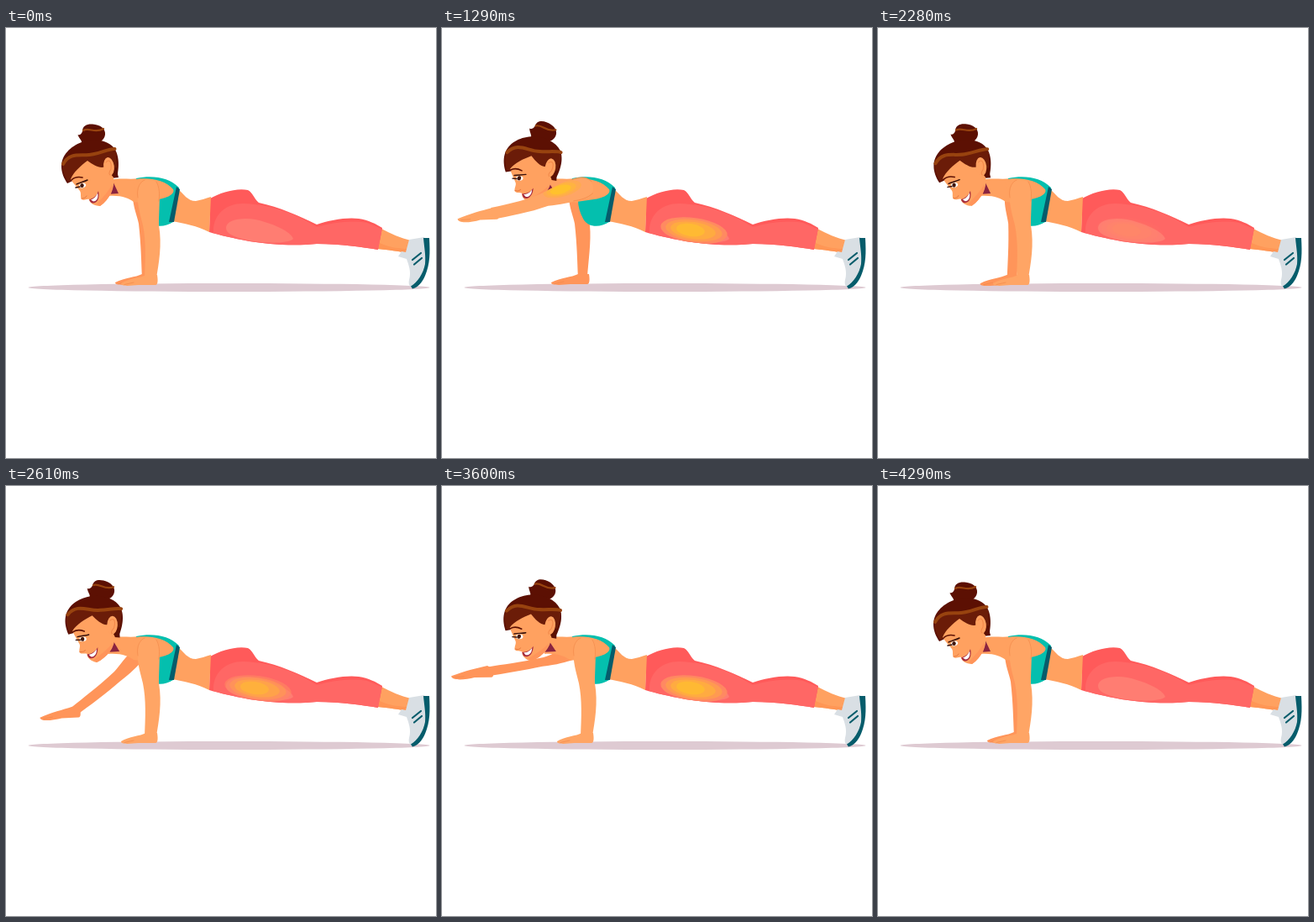
An HTML page with a canvas that plays this animation: 512x512 px, repeating every 4470 ms.

```html
<!DOCTYPE html>
<html lang="en">
<head>
<meta charset="utf-8">
<title>Plank arm raise</title>
<style>
html, body { margin: 0; width: 100%; height: 100%; overflow: hidden; background: #fff; }
canvas { display: block; width: 100vw; height: 100vh; }
</style>
</head>
<body>
<canvas id="stage"></canvas>
<script>
const canvas = document.getElementById('stage');
const ctx = canvas.getContext('2d');
const SIZE = 512, LOOP = 4470, STEP = 30, RAD = Math.PI / 180;

const SKIN = '#ffa160', SKIN_NEAR = '#ffa565', SKIN_FAR = '#ff955a', SKIN_LINE = '#f28a4b';
const HAIR = '#5c1003', HAIR_MID = '#6b1c08', HAIR_LIGHT = '#98430f';
const TEAL = '#04bfae', NAVY = '#065c6b';

const path = d => new Path2D(d);
const legs = path('M243 203C255 196 275 190 288 193C294 196 295 203 301 208C325 213 350 224 370 234C385 229 405 225 420 227C432 229 440 233 448 238L443 264C425 261 400 257 370 257C340 260 310 257 290 254C270 250 255 247 242 243Z');

function fill(shape, color) {
  ctx.fillStyle = color;
  ctx.fill(typeof shape === 'string' ? path(shape) : shape);
}

function line(d, color, width) {
  ctx.strokeStyle = color;
  ctx.lineWidth = width;
  ctx.stroke(path(d));
}

function oval(x, y, rx, ry, angle, color) {
  ctx.fillStyle = color;
  ctx.beginPath();
  ctx.ellipse(x, y, rx, ry, angle * RAD, 0, 2 * Math.PI);
  ctx.fill();
}

// 0 = hand on the floor, 1 = arm stretched forward
function lift(t, upFrom, upTo, downFrom, downTo) {
  const up = (t - upFrom) / (upTo - upFrom);
  const down = (downTo - t) / (downTo - downFrom);
  const u = Math.max(0, Math.min(1, up, down));
  return Math.sin(u * Math.PI / 2);
}

const nearArm = {
  x: 170, y: 190, wrist: [3, 108], swing: 78, stretch: .06, droop: 18,
  reach: 36, grow: 6, color: SKIN_NEAR, glow: true,
  shape: p => {
    const k = 4 * p;
    return `M-13 2C-12 -13 13 -14 13 4C13 20 12 32 ${12 - k / 2} 45C${16 - k} 68 ${12 - k / 2} 90 9 108L-5 108C-4 85 -3 65 -7 45C-10 32 -15 18 -13 2Z`;
  }
};

const farArm = {
  x: 157, y: 199, wrist: [11, 98], swing: 91, stretch: .08, droop: 3,
  reach: 38, grow: 5, color: SKIN_FAR, glow: false,
  shape: p => {
    const k = 8 * p;
    return `M-6 0C-4 -8 ${12 - k} -8 ${15 - k} 0C${17 - k} 10 ${19 - k} 20 ${19 - k} 36C${21 - k} 55 ${17 - k / 4} 80 16 98L5 98C4 80 4 60 1 34C-1 24 -6 14 -6 0Z`;
  }
};

function drawArm(arm, p) {
  const turn = arm.swing * p * RAD, len = 1 + arm.stretch * p;
  const [wx, wy] = [arm.wrist[0], arm.wrist[1] * len];
  const c = Math.cos(turn), s = Math.sin(turn);

  ctx.save();
  ctx.translate(arm.x + wx * c - wy * s, arm.y + wx * s + wy * c);
  ctx.rotate(-arm.droop * Math.sin(Math.PI * p) * RAD);
  const tip = arm.reach + arm.grow * p, heel = 8 - 2 * p, drop = 6 - 2 * p;
  fill(`M${-6 + 7 * p} ${-4 - 4 * p}C-14 ${-5 * p} -26 ${-2 * p} ${-tip} ${drop}C${-tip} 10 -26 9 -15 ${heel}L5 ${heel}C8 ${heel} 8 2 7 -4Z`, arm.color);
  line(`M${-tip + 4} ${drop + 1.5}L${-tip + 15} 5`, SKIN_LINE, .7);
  ctx.restore();

  ctx.save();
  ctx.translate(arm.x, arm.y);
  ctx.rotate(turn);
  ctx.scale(1, len);
  const shape = path(arm.shape(p));
  fill(shape, arm.color);
  if (arm.glow) {
    line('M-13 12C-15 0 -10 -7 -5 -9M9 -7C13 0 13 8 12 16', SKIN_LINE, .7);
    ctx.clip(shape);
    ctx.globalAlpha = p;
    oval(-5, 25, 9, 22, 0, '#ffaa50');
    oval(-5, 26, 7, 17, 0, '#ffb441');
    oval(-5, 27, 5, 12, 0, '#ffc22d');
  }
  ctx.restore();
}

function drawLegs(glow) {
  fill('M447 239C458 245 470 250 482 253L478 268C468 266 455 264 443 263Z', SKIN);
  fill('M445 256C456 261 468 263 479 263L478 268C468 266 455 264 443 263Z', '#ff9655');
  fill('M480 252L498 249L502 275C499 290 492 302 484 309C480 308 479 304 480 300C483 290 479 281 477 275L467 272L471 266L476 267Z', '#d9dfe4');
  fill('M497 250L504 250C505 268 505 281 499 295C495 304 490 309 484 310.500L482 307.500C490 303 497 292 499 281C500 270 498 262 497 250Z', NAVY);
  line('M484 276L494 268M486 281.500L495 274', NAVY, 2.2);

  fill(legs, '#ff5a5a');
  ctx.save();
  ctx.clip(legs);
  fill('M247 244C246 222 262 209 282 209C318 210 348 223 370 237C390 231 412 229 430 232L449 240L443 266L300 262Z', '#ff6765');
  fill('M262 238C262 226 290 224 308 231C325 236 340 244 342 251C335 258 300 256 285 252C272 249 262 245 262 238Z', '#ff7d72');
  ctx.globalAlpha = glow;
  oval(300, 241, 40, 15, 8, '#ff8b61');
  oval(300, 241, 34, 12.5, 8, '#ff9c50');
  oval(299, 241, 27, 10, 8, '#ffad40');
  oval(296, 240.5, 17, 7.5, 8, '#ffbb33');
  ctx.restore();
}

function drawTorso(p) {
  fill('M204 191C212 198 216 206 226 206C232 205 237 203 244 201L242 243C228 236 212 232 196 230Z', SKIN);
  fill('M124 181C136 178 148 181 158 179L185 180L190 204L163 208L152 207C146 203 138 199 122 200Z', SKIN);
  fill('M155 179C175 175 194 178 206 190L199 231C188 238 174 238 168 227C164 220 162 212 162 205Z', TEAL);
  fill('M150 181C166 177 189 180 199 192C202 198 190 203 181 204L160 207Z', SKIN);
  fill('M203 189L207 192L200 231L194 231Z', NAVY);
  fill(`M125 ${178 + 3 * p}L${134 + 2 * p} 197L${120 - 4 * p} 198Z`, '#8a2440');
}

function drawHead(p) {
  ctx.save();
  ctx.translate(110 + 2.5 * p, 181 - 3 * p);
  ctx.rotate(17 * p * RAD);
  ctx.translate(-110, -181);

  // bun and back of the hair
  fill('M90 137C91 134 87 132 85.500 127C88 128 90 126 91 123C91 116 97 114 103 114.500C112 115 119 120 118 127C117 134 111 137 104 138Z', HAIR);
  line('M92 122C99 118 106 126 116 120', HAIR_LIGHT, 2.2);
  fill('M66 165C66 151 77 141 90 136C103 131 120 133 128 142C136 152 134 167 133 174L134 178L124 179L92 176L73 185C69 179 66 172 66 165Z', HAIR);
  fill('M67 164C78 148 94 154 106 151C116 149 122 145 131 147L132 166L92 176L74 183C70 177 67 170 67 164Z', HAIR_MID);
  line('M68 162C77 146 91 154 105 150C115 148 122 144 129.500 144', HAIR_LIGHT, 4);

  // face
  fill('M97 158C89 164 80 172 77 180C80 185 85 190 88 194C90 197 88 201 90 204C93 206 96 203 99 204C99 208 105 212 112 212C118 208 122 202 125 197C128 191 129 184 128 178L118 165C112 168 104 163 97 158Z', SKIN);
  fill('M112 212C118 208 122 202 125 197L127 186C122 194 116 201 108 210Z', SKIN_FAR);
  oval(122.5, 165, 6.3, 11, -8, SKIN);
  line('M119 160C123 155 126 160 125 168C123 171 122 174 124 175', SKIN_LINE, 1.1);

  // features
  line('M78 181C82 177 86 177 91 178', HAIR, 1.6);
  oval(91, 187.5, 4.2, 2.8, -18, '#fff');
  oval(90.5, 187.5, 2.2, 2.6, 0, '#43180d');
  line('M84 186C88 184 93 183 97 181M83 190L88 189', '#35100b', 1.4);
  line('M90 203C93 203 95 202 96 200', '#e77b43', 1);
  fill('M110 194C112 202 109 209 103 208.500C101 208 100 206 99 204.500C104 203 108 200 110 194Z', '#a52b3d');
  fill('M109 196.500C110.500 202 108 206.500 104 206.500L101 204.500C105 203 107 201 109 196.500Z', '#fff');
  ctx.restore();
}

function draw(now) {
  const t = Math.floor((now % LOOP) / STEP) * STEP;
  const near = lift(t, 0, 900, 1140, 2040);
  const far = lift(t, 2250, 3150, 3360, 4290);
  const both = Math.max(near, far);

  const dpr = window.devicePixelRatio || 1;
  const w = Math.round(innerWidth * dpr), h = Math.round(innerHeight * dpr);
  if (canvas.width !== w || canvas.height !== h) {
    canvas.width = w;
    canvas.height = h;
  }
  ctx.setTransform(w / SIZE, 0, 0, h / SIZE, 0, 0);
  ctx.fillStyle = '#fff';
  ctx.fillRect(0, 0, SIZE, SIZE);
  ctx.lineCap = 'round';

  oval(265.5, 309, 239, 5, 0, '#decad2');
  drawArm(farArm, far);
  drawLegs(both);
  drawTorso(both);
  drawHead(both);
  drawArm(nearArm, near);
}

const start = performance.now();
function tick() {
  draw(performance.now() - start);
  requestAnimationFrame(tick);
}
tick();
</script>
</body>
</html>
```
